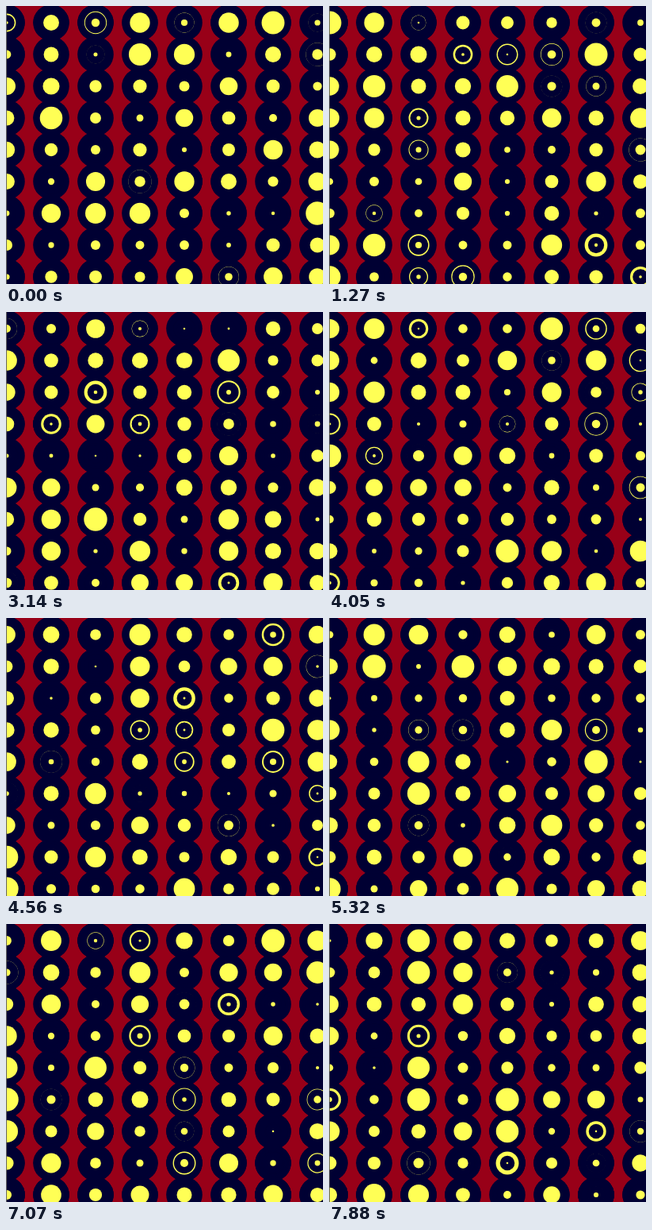
These frames come from a looping animation (400x350 px, 8000 ms). An HTML page with a canvas:

```html
<!DOCTYPE html>
<html lang="en">
<head>
<meta charset="utf-8">
<title>Pulsing dots</title>
<style>
  html, body { margin: 0; width: 100%; height: 100%; overflow: hidden; background: #980018; }
  canvas { display: block; width: 400px; height: 350px; }
</style>
</head>
<body>
<canvas id="stage" width="400" height="350"></canvas>
<script>
const ctx = document.getElementById('stage').getContext('2d');
const RED = '#980018', NAVY = '#000033', YELLOW = '#ffff55';
const COLS = 8, ROWS = 9, LOOP = 8000, WARMUP = 20;
const MIN_R = 1.2, MAX_R = 14.8, BORDER = 8;

// Runs of steps, about 145 ms apart: 150 ms first, 120 ms towards the end
const runs = [
  [120, 690], [970, 1840], [2090, 2990], [3140, 3440], [3750, 4560],
  [4870, 5770], [5920, 6340], [6620, 7310], [7610, 7880]
];
const times = runs.flatMap(([first, last]) => {
  const gaps = Math.round((last - first) / 145);
  return Array.from({ length: gaps + 1 }, (_, i) =>
    Math.min(first + 150 * i, last - 120 * (gaps - i)));
});

function seeded(seed) {
  return () => {
    seed = seed + 0x6D2B79F5 | 0;
    let a = Math.imul(seed ^ seed >>> 15, seed | 1);
    a ^= a + Math.imul(a ^ a >>> 7, a | 61);
    return ((a ^ a >>> 14) >>> 0) / 4294967296;
  };
}

function disc(x, y, r, color) {
  ctx.fillStyle = color;
  ctx.beginPath();
  ctx.arc(x, y, r, 0, 2 * Math.PI);
  ctx.fill();
}

function eachCell(draw) {
  for (let row = 0; row < ROWS; row++) {
    for (let col = 0; col < COLS; col++) draw(1 + 56 * col, 21 + 40 * row);
  }
}

// Nothing is cleared between steps, so larger, older dots
// stay visible as rings around the newer, bordered ones.
function drawStep(step) {
  const random = seeded(7);
  ctx.fillStyle = RED;
  ctx.fillRect(0, 0, 400, 350);
  eachCell((x, y) => disc(x, y, MAX_R + BORDER, NAVY));
  for (let s = -WARMUP; s <= step; s++) {
    eachCell((x, y) => {
      const r = MIN_R + (MAX_R - MIN_R) * random();
      disc(x, y, r + BORDER, NAVY);
      disc(x, y, r, YELLOW);
    });
  }
  ctx.fillStyle = '#666';
  ctx.fillRect(0, 0, 1, 350);
}

let shown = -1;
const start = performance.now();
function tick() {
  const t = (performance.now() - start) % LOOP;
  const step = times.filter(time => time <= t).length;
  if (step !== shown) drawStep(shown = step);
  requestAnimationFrame(tick);
}
tick();
</script>
</body>
</html>
```
